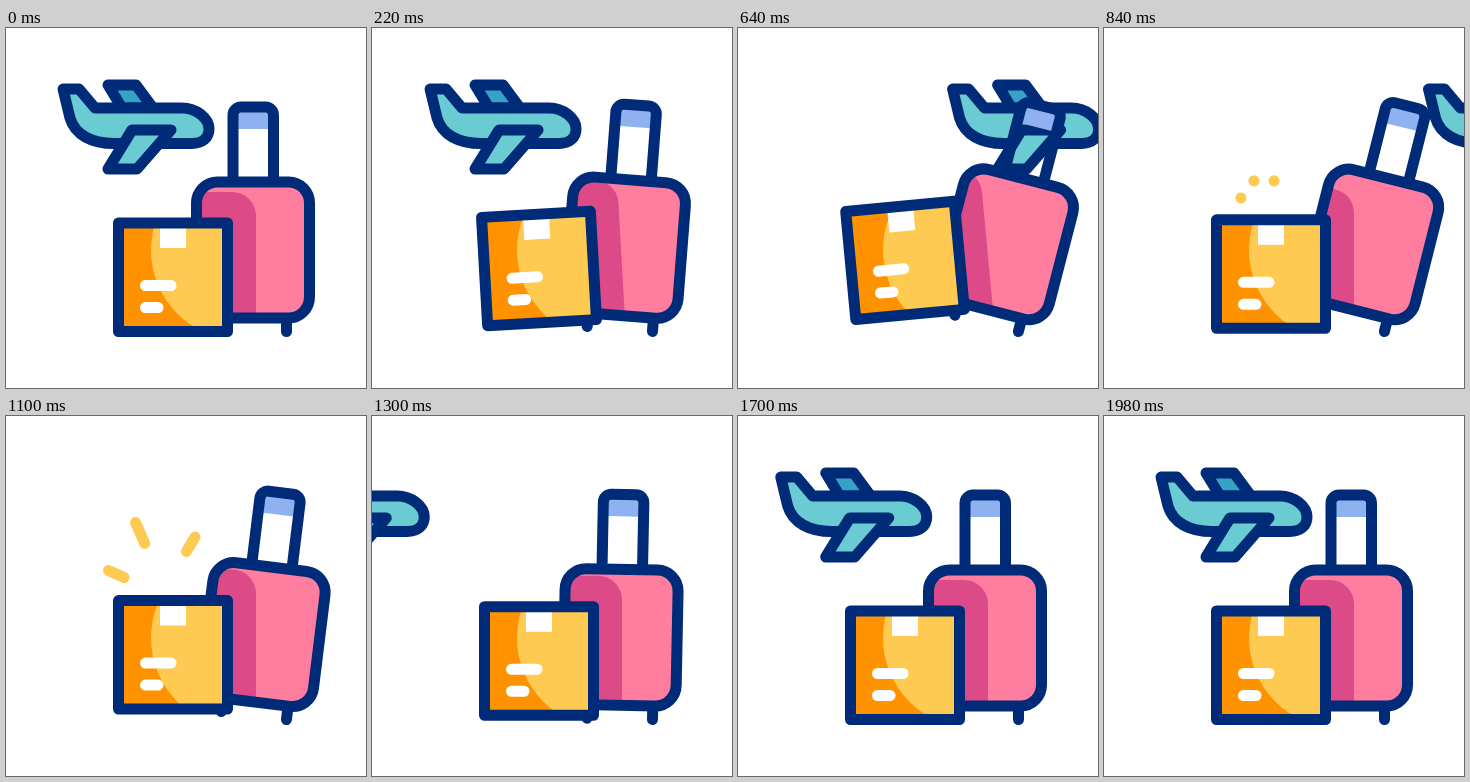
An HTML page with a canvas for the animation above (2.4 s loop, 360x360 px).

```html
<!DOCTYPE html>
<html lang="en">
<head>
<meta charset="utf-8">
<title>Travel luggage</title>
<style>
html, body { margin: 0; width: 100%; height: 100%; overflow: hidden; background: #fff; }
canvas { display: block; width: 360px; height: 360px; }
</style>
</head>
<body>
<canvas id="stage" width="360" height="360"></canvas>
<script>
const ctx = document.getElementById('stage').getContext('2d');
const LOOP = 2400;
const NAVY = '#002b78', TEAL = '#6bcbd2', BLUE = '#36a3c6', BAND = '#8fb1f0';
const PINK = '#ff7d9f', ROSE = '#dc4b87', ORANGE = '#ff9200', YELLOW = '#ffca51';

const shapes = {
  backWing: new Path2D('M102 57H130L147 80H116Z'),
  plane: new Path2D('M57 61H73L89 80H176C190 80 203 90 203 101C203 110 196 115.5 186 115.5H108C86 115.5 69 107 64 90Z'),
  frontWing: new Path2D('M126 102H165L131 141H102Z'),
  handle: new Path2D('M227 154V87A8 8 0 0 1 235 79H259.5A8 8 0 0 1 267.5 87V154'),
  band: new Path2D('M232 84H262.5V101H232Z'),
  feet: new Path2D('M215 290V303.5M280.5 290V303.5'),
  body: new Path2D(),
  shade: new Path2D('M150 164H226A24 24 0 0 1 250 188V330H150Z'),
  box: new Path2D('M112.5 195H221.5V303.5H112.5Z'),
  tape: new Path2D('M154 199H180V220H154Z'),
  labels: new Path2D('M139.5 257.5H165M139.5 279.5H152'),
  glow: new Path2D()
};
shapes.body.roundRect(190.5, 154, 113, 136, 21);
shapes.glow.arc(235, 222, 90, 0, Math.PI * 2);

// Each ray: inner end, outer end
const rays = [
  [137, 170, 102.5, 154.5],
  [150, 153, 129.5, 106.5],
  [170, 153, 189, 121]
];

function ease(t, from, to) {
  const p = Math.min(1, Math.max(0, (t - from) / (to - from)));
  return p * p * (3 - 2 * p);
}

// Eased value through [time, value] keys
function track(t, keys) {
  let v = keys[0][1];
  for (let i = 1; i < keys.length; i++) {
    v += (keys[i][1] - keys[i - 1][1]) * ease(t, keys[i - 1][0], keys[i][0]);
  }
  return v;
}

function fill(path, color) {
  ctx.fillStyle = color;
  ctx.fill(path);
}

function line(path, color = NAVY) {
  ctx.strokeStyle = color;
  ctx.stroke(path);
}

function paint(path, color) {
  fill(path, color);
  line(path);
}

function group(draw) {
  ctx.save();
  draw();
  ctx.restore();
}

function spin(x, y, deg) {
  ctx.translate(x, y);
  ctx.rotate(deg * Math.PI / 180);
  ctx.translate(-x, -y);
}

function planeShift(t) {
  if (t < 1100) return 381 * ease(t, 190, 1210);
  return -67 * Math.pow(Math.max(0, 1980 - t) / 500, 2.65);
}

function drawPlane(t) {
  ctx.translate(planeShift(t), 0);
  paint(shapes.backWing, BLUE);
  paint(shapes.plane, TEAL);
  paint(shapes.frontWing, TEAL);
}

function moveBox(t) {
  ctx.translate(0, -track(t, [[0, 0], [520, 22.5], [860, 3], [1120, 10.6], [1440, 0]]));
  spin(167, 249, track(t, [[0, 0], [520, -8.3], [820, 0]]));
}

function drawCase(t) {
  const tilt = track(t, [[0, 0], [600, 14.5], [780, 14.5], [1410, 0]]);
  const lean = () => spin(280, 303, tilt);
  group(() => {
    lean();
    fill(shapes.band, BAND);
    line(shapes.handle);
    line(shapes.feet);
    fill(shapes.body, PINK);
  });
  // The box casts its shade on the tilted case
  group(() => {
    lean();
    ctx.clip(shapes.body);
    spin(280, 303, -tilt);
    moveBox(t);
    fill(shapes.shade, ROSE);
  });
  group(() => {
    lean();
    line(shapes.body);
  });
}

function drawBox(t) {
  // The glow stays still while the box moves over it
  group(() => {
    moveBox(t);
    fill(shapes.box, ORANGE);
    ctx.clip(shapes.box);
    ctx.resetTransform();
    fill(shapes.glow, YELLOW);
  });
  moveBox(t);
  fill(shapes.tape, '#fff');
  line(shapes.labels, '#fff');
  line(shapes.box);
}

function drawRays(t) {
  if (t < 820 || t > 1250) return;
  const head = ease(t, 830, 1090), tail = ease(t, 920, 1260);
  ctx.strokeStyle = YELLOW;
  for (const [x, y, x2, y2] of rays) {
    const dx = x2 - x, dy = y2 - y;
    ctx.beginPath();
    ctx.moveTo(x + dx * tail, y + dy * tail);
    ctx.lineTo(x + dx * head + 0.01, y + dy * head);
    ctx.stroke();
  }
}

function render(t) {
  ctx.fillStyle = '#fff';
  ctx.fillRect(0, 0, 360, 360);
  ctx.lineWidth = 11;
  ctx.lineCap = ctx.lineJoin = 'round';
  for (const draw of [drawPlane, drawCase, drawRays, drawBox]) group(() => draw(t));
}

const start = performance.now();
function frame() {
  render((performance.now() - start) % LOOP);
  requestAnimationFrame(frame);
}
frame();
</script>
</body>
</html>
```
